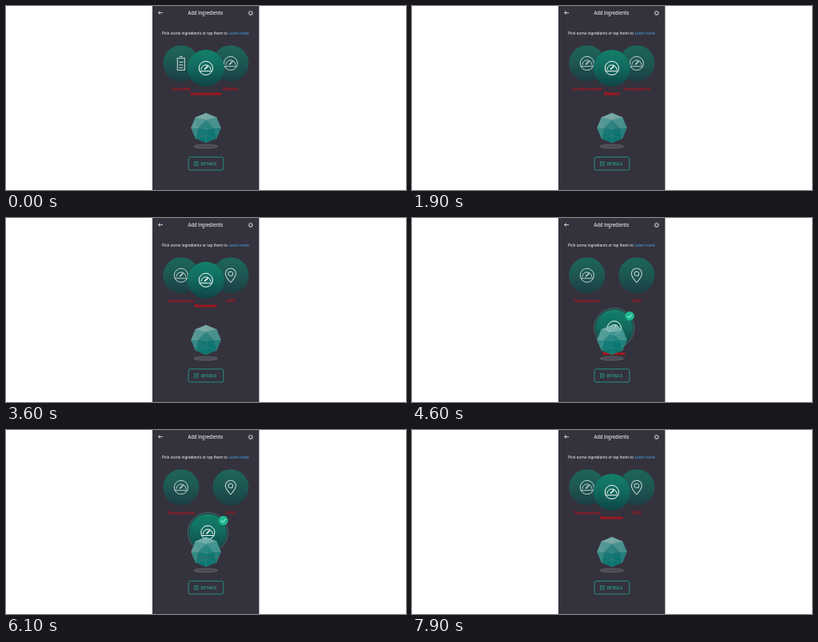
An HTML page with a canvas that plays this animation: 500 by 231 pixels, repeating every 8000 ms.

```html
<!DOCTYPE html>
<html lang="en">
<head>
<meta charset="utf-8">
<title>Add Ingredients</title>
<style>
html, body { margin: 0; width: 100%; height: 100%; overflow: hidden; background: #fff; }
canvas { display: block; width: 500px; height: 231px; }
</style>
</head>
<body>
<canvas id="stage"></canvas>
<script>
const W = 500, H = 231, LOOP = 8000, TAU = Math.PI * 2;
const BG = '#34323d', GREEN = '#239a84';
const canvas = document.getElementById('stage');
const ctx = canvas.getContext('2d');
const dpr = window.devicePixelRatio || 1;
canvas.width = W * dpr;
canvas.height = H * dpr;

const items = [
  { name: 'Humidity', icon: battery },
  { name: 'Accelerometer', icon: gauge },
  { name: 'Battery', icon: gauge },
  { name: 'Temperature', icon: gauge },
  { name: 'Barometer', icon: gauge },
  { name: 'GPS', icon: pin }
];
const DRAGGED = 4;

const clamp = v => Math.max(0, Math.min(1, v));
const phase = (t, from, to) => clamp((t - from) / (to - from));
const easeOut = u => 1 - (1 - u) ** 1.3;
const smooth = u => u * u * (3 - 2 * u);
const bump = (t, from, to) => Math.sin(Math.PI * phase(t, from, to));

// Index of the centred ingredient: one swipe adds one.
function scrollAt(t) {
  return 1 + easeOut(phase(t, 1500, 1900)) + easeOut(phase(t, 2500, 2800)) + easeOut(phase(t, 3300, 3600));
}

// Vertical pull: onto the gem to add, again to remove, then small rebounds.
function dragAt(t) {
  const add = smooth(phase(t, 4200, 4600)) - smooth(phase(t, 4900, 5400));
  const remove = smooth(phase(t, 5800, 6200)) - smooth(phase(t, 6200, 6500));
  return 60 * (add + remove) - 11 * bump(t, 6300, 7000) - 6 * bump(t, 7200, 7900);
}

function disc(x, y, r, fill, stroke, width = 1) {
  ctx.beginPath();
  ctx.arc(x, y, r, 0, TAU);
  if (fill) { ctx.fillStyle = fill; ctx.fill(); }
  if (stroke) { ctx.strokeStyle = stroke; ctx.lineWidth = width; ctx.stroke(); }
}

function line(color, width, ...p) {
  ctx.strokeStyle = color;
  ctx.lineWidth = width;
  ctx.beginPath();
  for (let i = 0; i < p.length; i += 2) ctx.lineTo(p[i], p[i + 1]);
  ctx.stroke();
}

function label(text, x, y, size, color, align = 'center', weight = 400) {
  ctx.font = `${weight} ${size}px Roboto, "Open Sans", sans-serif`;
  ctx.textAlign = align;
  ctx.textBaseline = 'middle';
  ctx.fillStyle = color;
  ctx.fillText(text, x, y);
}

function gauge() {
  disc(0, 0, 8.6, null, '#fff', 1);
  ctx.beginPath();
  ctx.arc(0, 2, 6, Math.PI, TAU);
  ctx.stroke();
  line('#fff', 1, -7.8, 3.8, 7.8, 3.8);
  line('#fff', 1.5, -1.8, 1.6, 2.6, -2.6);
}

function battery() {
  ctx.strokeStyle = '#fff';
  ctx.lineWidth = 1.1;
  ctx.strokeRect(-4.5, -6.5, 9, 15);
  line('#fff', 1.1, -2, -8.5, 2, -8.5);
  for (let y = -1.5; y < 6; y += 3.5) line('#fff', 1.1, -2.5, y, 2.5, y);
}

function pin() {
  ctx.strokeStyle = '#fff';
  ctx.lineWidth = 1.1;
  ctx.beginPath();
  ctx.moveTo(0, 9);
  ctx.quadraticCurveTo(-6.5, 2, -6.5, -2.2);
  ctx.arc(0, -2.2, 6.5, Math.PI, TAU);
  ctx.quadraticCurveTo(6.5, 2, 0, 9);
  ctx.stroke();
  disc(0, -2, 2.8, null, '#fff', 1.1);
}

function slot(s) {
  const a = Math.abs(s), k = Math.min(a, 1), out = Math.max(0, a - 1);
  return {
    x: 249.8 + Math.sign(s) * (31 * (k + 0.32 * k * (1 - k)) + 13 * out),
    y: 78 - 6 * k * k - 10 * out,
    near: 1 - k,
    alpha: clamp(1 - 2 * out)
  };
}

function ingredient(item, s, drag, picked) {
  const p = slot(s);
  if (!p.alpha) return;
  const x = p.x + Math.max(0, drag) * 0.05, y = p.y + drag;
  const r = 22.6 + 0.5 * p.near, front = p.near > 0.5;
  ctx.save();
  if (picked) disc(x, y, 25.2, 'rgba(32,82,80,.75)', 'rgba(110,160,155,.5)', 0.7);
  // Opaque backing keeps overlapping discs from mixing.
  ctx.globalAlpha = p.alpha;
  disc(x, y, r, BG);
  ctx.globalAlpha = p.alpha * (0.66 + 0.34 * p.near);
  const g = ctx.createLinearGradient(0, y - r, 0, y + r);
  g.addColorStop(0, '#12816a');
  g.addColorStop(0.5, '#11695d');
  g.addColorStop(1, '#104447');
  disc(x, y, r, g);
  ctx.globalAlpha = p.alpha * (0.72 + 0.28 * p.near);
  ctx.translate(x, y);
  item.icon();
  ctx.globalAlpha = p.alpha * (0.85 + 0.15 * p.near);
  label(item.name, 0, 32, front ? 5.9 : 6, '#e8060f', 'center', front ? 700 : 400);
  ctx.globalAlpha = 1;
  if (picked) {
    disc(19.3, -15, 5.8, '#20b992');
    line('#d9fff3', 1, 16.5, -15, 18.6, -12.9, 22.3, -16.9);
  }
  ctx.restore();
}

function gem() {
  const cx = 250, cy = 153;
  ctx.beginPath();
  ctx.ellipse(249.7, 176.3, 14.8, 2.3, 0, 0, TAU);
  ctx.fillStyle = '#484952';
  ctx.fill();
  ctx.strokeStyle = '#6d6f77';
  ctx.lineWidth = 0.7;
  ctx.stroke();

  const at = (i, r) => [r * Math.sin(i * TAU / 8), -r * Math.cos(i * TAU / 8)];
  const outer = i => at(i, 18.7), inner = i => at(2 * i, 10), apex = [1, 2];
  const facet = (...pts) => {
    const mid = k => pts.reduce((v, p) => v + p[k], 0) / 3;
    const mx = mid(0), my = mid(1), rim = Math.hypot(mx, my) / 18;
    const u = clamp(0.12 - mx * 0.006 - my * 0.032 + 0.4 * rim * rim);
    const mix = (a, b) => Math.round(a + (b - a) * u);
    ctx.fillStyle = `rgb(${mix(8, 150)}, ${mix(126, 196)}, ${mix(120, 192)})`;
    ctx.strokeStyle = 'rgba(165,214,207,.25)';
    ctx.lineWidth = 0.4;
    ctx.beginPath();
    pts.forEach(p => ctx.lineTo(...p));
    ctx.closePath();
    ctx.fill();
    ctx.stroke();
  };
  ctx.save();
  ctx.translate(cx, cy);
  ctx.globalAlpha = 0.88;
  for (let i = 0; i < 4; i++) {
    facet(apex, inner(i), inner(i + 1));
    facet(inner(i), inner(i + 1), outer(2 * i + 1));
    facet(inner(i), outer(2 * i), outer(2 * i + 1));
    facet(inner(i + 1), outer(2 * i + 1), outer(2 * i + 2));
  }
  ctx.restore();
}

function gear(x, y) {
  const color = '#a9a9b0';
  disc(x, y, 2, null, color, 1.3);
  for (let i = 0; i < 8; i++) {
    const c = Math.cos(i * TAU / 8), s = Math.sin(i * TAU / 8);
    line(color, 1, x + 2.3 * c, y + 2.3 * s, x + 3.2 * c, y + 3.2 * s);
  }
}

function chrome() {
  ctx.fillStyle = '#fff';
  ctx.fillRect(0, 0, W, H);
  ctx.fillStyle = BG;
  ctx.fillRect(183, 0, 133.4, H);

  line('#ddd', 0.9, 196, 8.5, 190.5, 8.5);
  line('#ddd', 0.9, 192.8, 6.2, 190.5, 8.5, 192.8, 10.8);
  label('Add Ingredients', 249.2, 8.8, 6.3, '#f4f4f6');
  gear(305.8, 8.9);

  label('Pick some ingredients or tap them to', 195, 34.2, 5, '#ededf0', 'left');
  label('Learn more', 278.4, 34.2, 5, '#4a9fe0', 'left');

  ctx.strokeStyle = GREEN;
  ctx.lineWidth = 0.9;
  ctx.beginPath();
  ctx.roundRect(228, 189.7, 43.8, 16.3, 2);
  ctx.stroke();
  ctx.lineWidth = 0.7;
  ctx.strokeRect(235.6, 195.5, 4.6, 4.8);
  for (let y = 197; y < 200; y += 1.7) line(GREEN, 0.7, 236.6, y, 239.2, y);
  label('DETAILS', 243.4, 198.1, 5.1, '#27a88f', 'left', 500);
}

function draw(t) {
  ctx.setTransform(dpr, 0, 0, dpr, 0, 0);
  const scroll = scrollAt(t), drag = dragAt(t);
  const picked = t >= 4600 && t < 6300;
  chrome();
  items.map((item, i) => ({ item, s: i - scroll, held: i === DRAGGED }))
    .sort((a, b) => Math.abs(b.s) - Math.abs(a.s))
    .forEach(({ item, s, held }) => ingredient(item, s, held ? drag : 0, held && picked));
  gem();
}

const start = performance.now();
function tick() {
  const t = (performance.now() - start) % LOOP;
  draw(Math.floor(t / 100) * 100); // ten poses per second
  requestAnimationFrame(tick);
}
tick();
</script>
</body>
</html>
```
